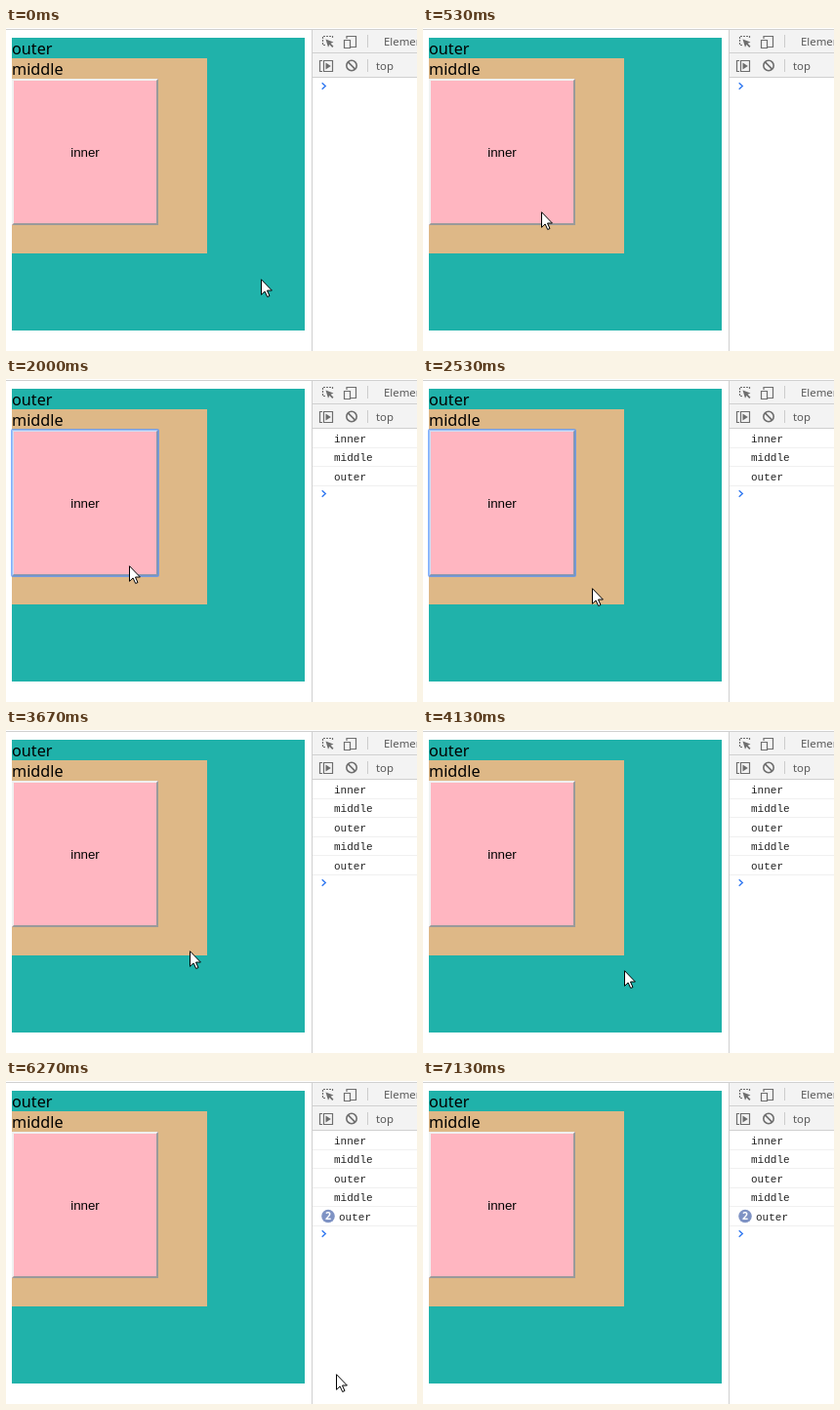
These frames come from a looping animation (421 by 331 pixels, 7740 ms). An HTML page:

```html
<!DOCTYPE html>
<html lang="en">
<head>
<meta charset="utf-8">
<title>Event bubbling</title>
<style>
  html, body { margin: 0; width: 100%; height: 100%; overflow: hidden; background: #fff; }
  svg { display: block; }
  .box { font: 16.2px "Noto Sans", sans-serif; }
  .button { font: 13.33px "Liberation Sans", Arial, sans-serif; text-anchor: middle; }
  .tools { font: 11.4px "Noto Sans", sans-serif; fill: #5a5a5a; }
  .log { font: 11px "Liberation Mono", monospace; fill: #222; }
  .count { font: bold 10.5px "Noto Sans", sans-serif; fill: #fff; text-anchor: middle; }
  .icon { fill: none; stroke: #6e6e6e; stroke-width: 1.2; }
  .solid { fill: #6e6e6e; stroke: none; }
</style>
</head>
<body>
<svg width="421" height="331" viewBox="0 0 421 331">
  <rect width="421" height="331" fill="#fff"/>

  <rect x="6" y="10" width="300" height="300" fill="#20b2aa"/>
  <rect x="6" y="31" width="200" height="200" fill="#deb887"/>
  <text class="box" x="6" y="27">outer</text>
  <text class="box" x="6" y="48">middle</text>

  <rect x="6" y="52" width="150" height="150" fill="#ffb6c1"/>
  <path id="topLeft" d="M6 52H156L154 54H8V200L6 202Z"/>
  <path id="bottomRight" d="M156 202H6L8 200H154V54L156 52Z"/>
  <g id="ring" fill="none" stroke="#4d90fe">
    <rect x="5.5" y="51.5" width="151" height="151" rx="1" opacity=".7"/>
    <rect x="6.5" y="52.5" width="149" height="149" opacity=".5"/>
    <rect x="7.5" y="53.5" width="147" height="147" opacity=".2"/>
  </g>
  <text class="button" x="81" y="132">inner</text>

  <rect x="314" y="2" width="107" height="49" fill="#f3f3f3"/>
  <path d="M0 1.5H421M313.5 2V331M314 25.5H421M314 50.5H421" stroke="#d0d0d0"/>
  <path d="M370.5 7V20M370.5 32V45" stroke="#ccc"/>
  <g class="icon">
    <path d="M327 17.5H324.5V8.5H334.5V11" stroke-dasharray="2 1"/>
    <path class="solid" d="M327.5 11.5L335.5 14.6L332.6 15.8L335.5 18.8L334.2 20L331.4 17L330 19.8Z"/>
    <path d="M349 11V8.5H358.5V19.5H353M346.5 12.5H352.5V20.5H346.5Z"/>
    <path d="M324 33.5H321.5V44.5H324M325.5 33.5H334.5V44.5H325.5Z"/>
    <path class="solid" d="M327.5 35.5L332.8 39L327.5 42.5Z"/>
    <circle cx="354" cy="38.5" r="5.2" stroke-width="1.6"/>
    <path d="M350.4 34.9L357.6 42.1" stroke-width="1.6"/>
  </g>
  <text class="tools" x="387" y="18">Elements</text>
  <text class="tools" x="379" y="43">top</text>

  <g id="console"></g>
  <g id="badge">
    <circle cx="330" cy="138.5" r="6.8" fill="#7f93c4"/>
    <text class="count" x="330" y="142.4">2</text>
  </g>
  <path id="prompt" d="M323.7 56.2L327.2 59.5L323.7 62.8" fill="none" stroke="#367cf1" stroke-width="1.5"/>

  <path id="cursor" d="M.5 .7V16.3L4.1 12.9L6.7 18.5L9 17.5L6.5 12H11.4Z" fill="#fff" stroke="#000"/>
</svg>
<script>
const LOOP = 7740, TICKS_PER_MS = 0.015, ROW = 19.4;
const $ = id => document.getElementById(id);

const linear = u => u;
const smooth = u => u * u * (3 - 2 * u);
const out = u => 1 - (1 - u) ** 1.8;

// first tick, number of steps, end x, end y, easing
const moves = [
  [0, 1, 261, 257, linear],
  [1, 1, 254, 251, linear],
  [4, 5, 121, 188, smooth],
  [30, 1, 126, 191, linear],
  [31, 8, 173, 214, out],
  [53, 3, 188, 226, linear],
  [56, 7, 206, 246, out],
  [75, 3, 93, 324, linear],
  [78, 1, 0, 400, linear],
  [93, 1, 292, 307, linear],
  [94, 1, 338, 300, linear],
  [98, 6, 47, 325, smooth],
  [106, 1, 47, 328, linear],
  [107, 1, 0, 400, linear]
];
const press = 19, release = 21, blur = 48, repeat = 72;
const logs = [["inner", 21], ["middle", 21], ["outer", 21], ["middle", 49], ["outer", 49]];

function add(parent, name, attrs) {
  const el = document.createElementNS(parent.namespaceURI, name);
  for (const key in attrs) el.setAttribute(key, attrs[key]);
  return parent.appendChild(el);
}

const rows = logs.map(([word, tick], i) => {
  const group = add($("console"), "g", {});
  const text = add(group, "text", { class: "log", x: 336, y: Math.round(65 + i * ROW) });
  text.textContent = word;
  const y = Math.round(70 + i * ROW) + 0.5;
  add(group, "path", { d: `M314 ${y}H421`, stroke: "#f0f0f0" });
  return { group, text, tick };
});

const show = (el, on) => el.setAttribute("visibility", on ? "visible" : "hidden");

function cursorAt(tick) {
  let x = 0, y = 400;
  for (const [start, steps, endX, endY, ease] of moves) {
    if (tick < start) break;
    const p = ease(Math.min(1, (tick - start + 1) / steps));
    x += (endX - x) * p;
    y += (endY - y) * p;
  }
  return [Math.round(x), Math.round(y)];
}

function draw(ms) {
  // small offset: tick times are rounded to 10 ms
  const tick = Math.floor((ms + 3.4) * TICKS_PER_MS);
  $("cursor").setAttribute("transform", `translate(${cursorAt(tick)})`);

  const pressed = tick >= press && tick < release;
  $("topLeft").setAttribute("fill", pressed ? "#9a9a9a" : "#f0f0f0");
  $("bottomRight").setAttribute("fill", pressed ? "#f0f0f0" : "#9a9a9a");
  show($("ring"), tick >= press && tick < blur);

  rows.forEach(row => show(row.group, tick >= row.tick));
  const count = rows.filter(row => tick >= row.tick).length;
  $("prompt").setAttribute("transform", `translate(0 ${Math.round(count * ROW)})`);

  show($("badge"), tick >= repeat);
  rows[4].text.setAttribute("x", tick >= repeat ? 341 : 336);
}

const began = performance.now();
function frame() {
  draw((performance.now() - began) % LOOP);
  requestAnimationFrame(frame);
}
frame();
</script>
</body>
</html>
```
